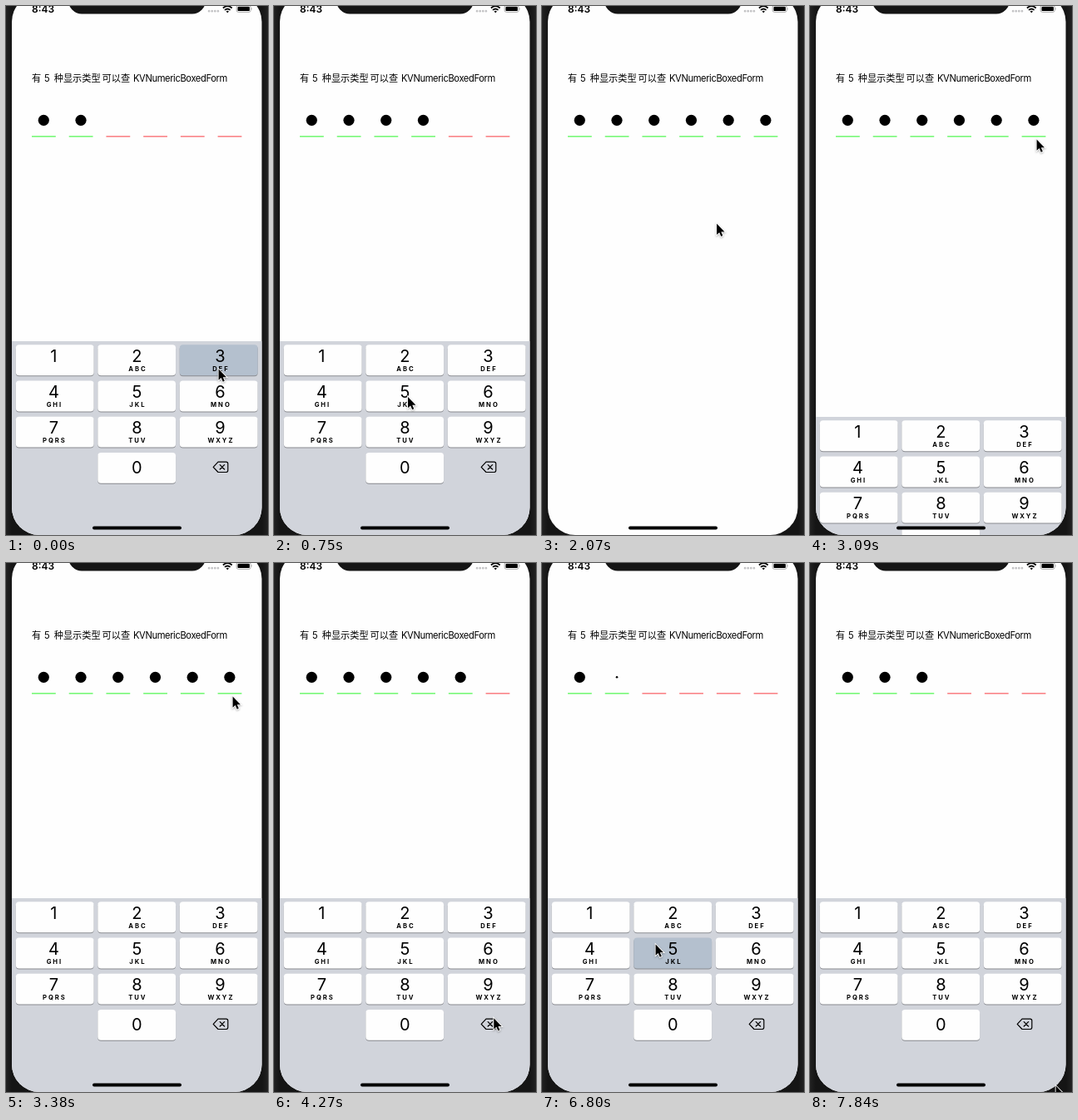
Write an HTML page that moves like this. It is 315x636 px and loops after 7990 ms.

```html
<!DOCTYPE html>
<html lang="zh">
<head>
<meta charset="utf-8">
<style>
  html, body { margin: 0; width: 100%; height: 100%; overflow: hidden; background: #1b1b1b; }
  svg { display: block; width: 315px; height: 636px; font-family: Inter, Roboto, sans-serif; }
  .title { font-size: 11.2px; font-family: Inter, "Noto Sans CJK SC", "Noto Sans CJK", sans-serif; }
  .digit { font-size: 20px; text-anchor: middle; }
  .sub { font-size: 7.7px; font-weight: 700; letter-spacing: 1.9px; text-anchor: middle; }
  #arrow { filter: drop-shadow(0 1px 1px rgba(0, 0, 0, .3)); }
</style>
</head>
<body>
<svg viewBox="0 0 315 636">
  <defs>
    <clipPath id="screen"><rect x="7" y="-14" width="300.5" height="650" rx="33"/></clipPath>
    <linearGradient id="bezel">
      <stop offset="0" stop-color="#222"/><stop offset=".022" stop-color="#151515"/>
      <stop offset=".978" stop-color="#151515"/><stop offset="1" stop-color="#222"/>
    </linearGradient>
  </defs>
  <rect width="315" height="636" fill="url(#bezel)"/>
  <g clip-path="url(#screen)">
    <rect x="7" y="-14" width="301" height="650" fill="#fefefe"/>
    <g class="title">
      <text x="31" y="91">有</text>
      <text x="46" y="91">5</text>
      <text x="57.7" y="91">种显示类型</text>
      <text x="115.5" y="91">可以查</text>
      <text x="153" y="91" letter-spacing="-.4">KVNumericBoxedForm</text>
    </g>
    <g id="fields"></g>
    <g id="board"><rect x="7" y="403" width="301" height="240" fill="#d1d4db"/></g>
    <rect x="104" y="625.6" width="107" height="4" rx="2"/>
    <path d="M75 -7 A16 16 0 0 0 91 9.4 H224 A16 16 0 0 0 240 -7Z" fill="#151515"/>
    <text x="31" y="7.8" font-size="12" font-weight="600">8:43</text>
    <path d="M244.1 6.2 H256" stroke="#c4c4c6" stroke-width="2.8" stroke-linecap="round" stroke-dasharray="0 3.6"/>
    <g fill="none" stroke="#000" stroke-width="1.8">
      <path d="M260.9 2.5 Q266.3 -2.2 271.7 2.5"/>
      <path d="M263 4.9 Q266.3 2 269.6 4.9"/>
    </g>
    <path d="M264.6 6.4 Q266.3 5 268 6.4 L266.3 8.2Z"/>
    <rect x="277.2" y="-.6" width="17" height="8" rx="2.2" fill="none" stroke="#999" stroke-width=".8"/>
    <rect x="278.5" y=".7" width="14.4" height="5.4" rx="1.2"/>
    <path d="M295.2 2 Q296.6 3.4 295.2 4.8Z" fill="#999"/>
  </g>
  <path id="arrow" d="M.6 .6 V13.8 L3.7 11 L5.8 15.7 L7.8 14.8 L5.8 10.2 H10Z" stroke="#fff" stroke-width="1.8" paint-order="stroke"/>
</svg>
<script>
const LOOP = 7990, STEPS = 54, BOARD = 233, TRAVEL = 5;
const $ = id => document.getElementById(id);
const stop = (step, x, y, key) => ({ step, x, y, key });

// where the pointer arrives, and the digit it taps there
const stops = [
  stop(0, 255, 436, 3),
  stop(3, 244, 465, 6),
  stop(6, 150, 470, 5),
  stop(10, 102, 491, 7),
  stop(17, 270, 132),
  stop(20, 272, 160),
  stop(28, 265, 548),
  stop(32, 262, 545),
  stop(39, 262, 545),
  stop(43, 92, 464, 4),
  stop(45, 136, 458, 5),
  stop(48, 136, 458, 5),
  stop(53, 295, 628)
];
const taps = stops.filter(s => s.key);
const erases = Array.from({ length: 6 }, (_, i) => Math.floor(28 + 2.25 * i));

function ease(step, from, to) {
  const p = Math.min(1, Math.max(0, (step - from) / (to - from)));
  return 1 - (1 - p) ** 2;
}

function add(parent, tag, attrs, text) {
  const el = document.createElementNS('http://www.w3.org/2000/svg', tag);
  for (const name in attrs) el.setAttribute(name, attrs[name]);
  if (text) el.textContent = text;
  parent.append(el);
  return el;
}

const fields = Array.from({ length: 6 }, (_, i) => {
  const x = 31 + i * 44.72;
  return {
    line: add($('fields'), 'rect', { x, y: 156, width: 28.8, height: 1.6 }),
    dot: add($('fields'), 'circle', { cx: x + 14.3, cy: 137.3 })
  };
});

// labels sit in the middle of 100 px cells, a little wider than the key pitch
const keys = {};
function addKey(digit, col, row, sub) {
  const x = 11.8 + col * 98.5, y = 407.3 + row * 43.2, mid = 57.4 + col * 100;
  const box = { x, width: 93.8, height: 36.9, rx: 4 };
  add($('board'), 'rect', { ...box, y: y + 1, fill: '#898b90' });
  keys[digit] = add($('board'), 'rect', { ...box, y });
  add($('board'), 'text', { class: 'digit', x: mid, y: y + (sub === undefined ? 24.6 : 20.4) }, String(digit));
  if (sub) add($('board'), 'text', { class: 'sub', x: mid + 1, y: y + 31.6 }, sub);
}
['', 'ABC', 'DEF', 'GHI', 'JKL', 'MNO', 'PQRS', 'TUV', 'WXYZ']
  .forEach((sub, i) => addKey(i + 1, i % 3, Math.floor(i / 3), sub));
addKey(0, 1, 3);

const del = add($('board'), 'path', {
  d: 'M249.2 554.3 L255 548.1 H264.6 Q266.8 548.1 266.8 550.3 V558.3 Q266.8 560.5 264.6 560.5 H255Z',
  stroke: '#000', 'stroke-width': 1.2, 'stroke-linejoin': 'round'
});
const cross = add($('board'), 'path', {
  d: 'M257.2 551.6 l5.4 5.4 m0 -5.4 l-5.4 5.4', 'stroke-width': 1.2, 'stroke-linecap': 'round'
});

// a digit shows one step after its tap, an erase works at once
function entered(step) {
  const born = [-9, -9];
  for (let s = 0; s <= step; s++) {
    if (erases.includes(s)) born.pop();
    if (taps.some(t => t.step + 1 === s)) born.push(s);
  }
  return born;
}

function pointer(step) {
  const i = Math.max(1, stops.findIndex(s => s.step >= step));
  const a = stops[i - 1], b = stops[i];
  const p = ease(step, Math.max(a.step, b.step - TRAVEL), b.step);
  return `${a.x + (b.x - a.x) * p} ${a.y + (b.y - a.y) * p}`;
}

function draw(step) {
  const born = entered(step);
  fields.forEach(({ line, dot }, i) => {
    const on = i < born.length;
    line.setAttribute('fill', on ? '#78f878' : '#fa8488');
    dot.setAttribute('r', !on ? 0 : step === born[i] ? 1.3 : 6.6);
  });

  for (const k in keys) {
    const held = taps.some(t => t.key === +k && (step === t.step || step === t.step + 1));
    keys[k].setAttribute('fill', held ? '#b4c0ce' : '#fefefe');
  }
  const erasing = erases.includes(step);
  del.setAttribute('fill', erasing ? '#000' : 'none');
  cross.setAttribute('stroke', erasing ? '#fff' : '#000');

  const drop = BOARD * (ease(step, 11, 14) - ease(step, 19.8, 23));
  $('board').setAttribute('transform', `translate(0 ${drop})`);
  $('arrow').setAttribute('transform', `translate(${pointer(step)})`);
}

function tick() {
  const t = performance.now() % LOOP;
  draw(Math.min(STEPS - 1, Math.floor(t / LOOP * STEPS + .15)));
  requestAnimationFrame(tick);
}
tick();
</script>
</body>
</html>
```
